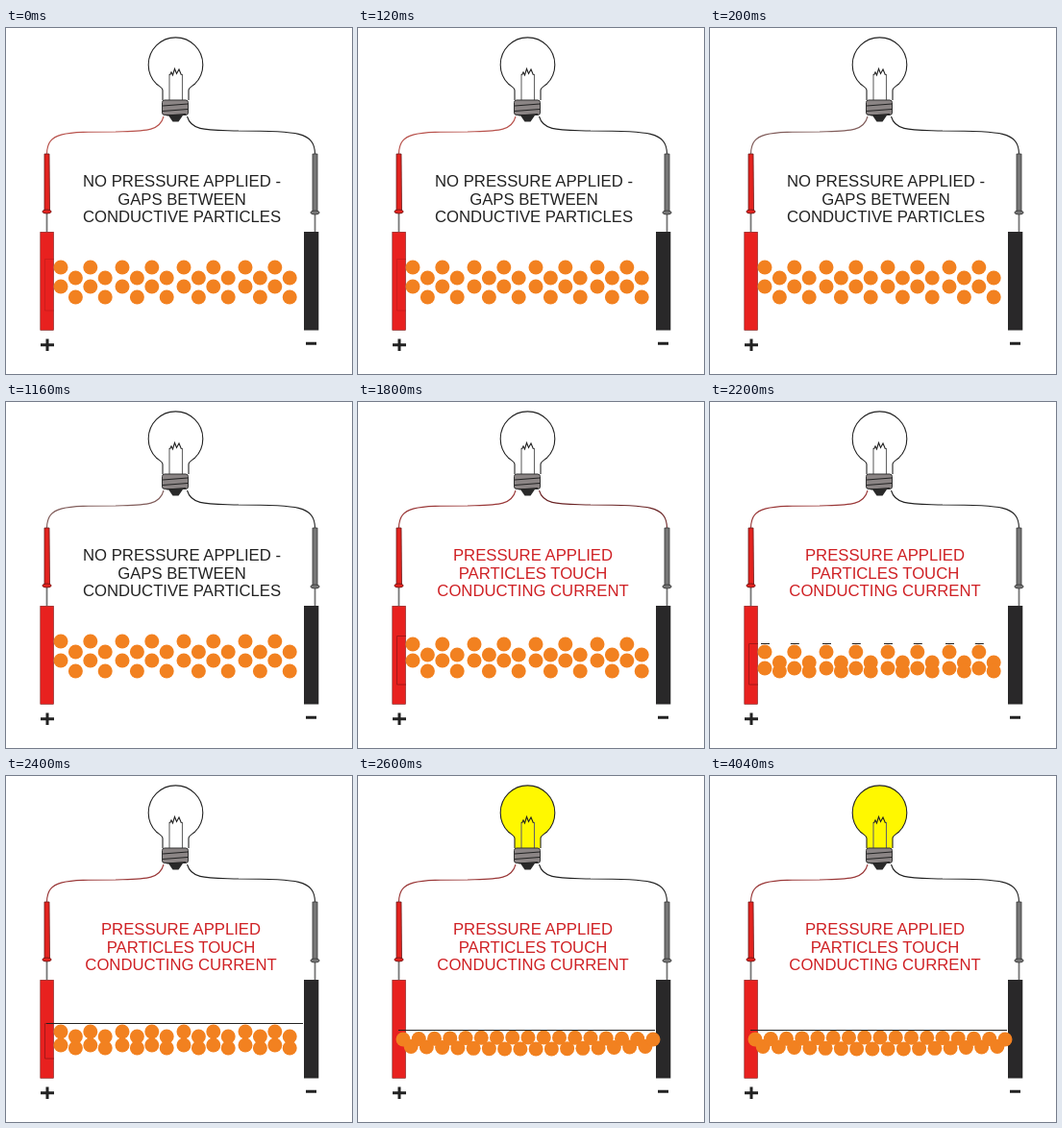
These frames come from a looping animation (360 px wide and 360 px high, 5000 ms). An HTML page:

```html
<!DOCTYPE html>
<html lang="en">
<head>
<meta charset="utf-8">
<title>Pressure-sensitive conduction</title>
<style>
  html, body { margin: 0; width: 100%; height: 100%; overflow: hidden; background: #fff; }
  svg { display: block; width: 100vw; height: 100vh; }
  text { font: 16.7px "Liberation Sans", Arial, sans-serif; text-anchor: middle; }
  .line { fill: none; stroke: #222; stroke-width: 1.1; }
</style>
</head>
<body>
<svg viewBox="0 0 360 360">
  <!-- bulb -->
  <path id="glass" class="line"
    d="M163 75V65C163 62 160 61 156.500 58.200A28.300 28.300 0 1 1 196.500 58.200C193 61 190 62 190 65V75"/>
  <path class="line" style="stroke:#666" d="M170 75V48M183.500 75V48"/>
  <path class="line" d="M170.500 49L172 46 173.500 49 175.500 42.500 177.500 47.500 180 43 182.500 49"/>
  <path d="M169 91H184L179.500 97.500H173.500Z" fill="#292929"/>
  <rect x="162.500" y="75" width="27" height="15.500" rx="2.500" fill="#8b8585" stroke="#333"/>
  <path class="line" d="M163 81L189 79M163 86.500L189 84.500M167 91L187 89.500"/>

  <!-- wires -->
  <path id="wireL" class="line" d="M164 92C160 108 144 107 114 108C60 108 43 108 42.500 131"/>
  <path id="wireR" class="line" d="M188.500 92C193 108 211 106 242 107C303 107 321 108 321.500 131"/>

  <!-- probes -->
  <path class="line" style="stroke:#777;stroke-width:1.8" d="M42.500 192V212M321.500 192V212"/>
  <g fill="#e3231f" stroke="#651717" stroke-width=".8">
    <path d="M40 131H45L45.500 190H40Z"/><ellipse cx="42.500" cy="191" rx="4.700" ry="2"/>
  </g>
  <g fill="#777" stroke="#333" stroke-width=".8">
    <path d="M319 131H324V191H319Z"/><ellipse cx="321.500" cy="192" rx="4.700" ry="2"/>
  </g>

  <!-- electrodes -->
  <rect x="35.800" y="212.300" width="13.700" height="102" fill="#e8211f" stroke="#7d1a18" stroke-width=".6"/>
  <rect x="310" y="212" width="15.300" height="102.500" fill="#292829"/>
  <path d="M36 329.800H50M43 323.500V336M312 328.300H323" fill="none" stroke="#222" stroke-width="3"/>

  <path id="sleeve" fill="none" stroke="#a51717"/>
  <g id="beads" fill="#f28120"></g>
  <path id="plate" class="line"/>
  <g id="label"></g>
</svg>
<script>
const $ = id => document.getElementById(id);
const idleText = ["NO PRESSURE APPLIED -", "GAPS BETWEEN", "CONDUCTIVE PARTICLES"];
const pressedText = ["PRESSURE APPLIED", "PARTICLES TOUCH", "CONDUCTING CURRENT"];
const lastStage = 5;

const range = (n, fn) => Array.from({ length: n }, (_, i) => fn(i));

// Columns stand in groups of four
const columnX = i => 57 + 64 * (i >> 2) + 15.4 * (i % 4);

// Separate beads: the upper rows follow the plate and push the lower ones down
function looseBeads(drop) {
  return range(16, i => {
    const odd = i % 2;
    const top = odd ? Math.min(260 + drop, 271) : 249 + drop;
    const low = odd ? Math.max(280, 266 + drop)
                    : Math.min(280, Math.max(269, top + 17));
    return [[columnX(i), top], [columnX(i), low]];
  }).flat();
}

// Touching beads: a zigzag chain that swings wider in the middle
function chainBeads() {
  return range(33, i => {
    const swing = 3 + 2 * Math.sin(Math.PI * i / 32);
    return [47 + 8.125 * i, 277 + swing * (i % 2 ? 1.4 : -1)];
  });
}

function platePath(stage, y) {
  if (stage < 2) return "";
  if (stage > 3) return `M42 ${y}H309`;
  return range(8, i => `M${columnX(2 * i) - 4} ${y}h9`).join("");
}

function draw(stage, starting) {
  const on = stage > 0, lit = stage === lastStage;
  const drop = Math.round(stage * (2.1 + 0.53 * stage));
  const y = 240.5 + drop;
  $("glass").style.fill = lit ? "#fff800" : "none";
  $("wireL").style.stroke = on ? "#9a3838" : starting ? "#b8524c" : "#805c5a";
  $("wireR").style.stroke = on && stage < 3 ? "#6a2425" : "#222";
  $("sleeve").setAttribute("d", `M50 ${y}H40.500V294H50`);
  $("sleeve").style.opacity = lit ? 0 : on ? 1 : starting ? 0.4 : 0;
  $("plate").setAttribute("d", platePath(stage, y));
  $("beads").innerHTML = (lit ? chainBeads() : looseBeads(drop))
    .map(([x, y]) => `<circle cx="${x}" cy="${y}" r="7.500"/>`).join("");
  $("label").setAttribute("fill", on ? "#cf2024" : "#222");
  $("label").innerHTML = (on ? pressedText : idleText)
    .map((s, i) => `<text x="${on ? 182 : 183}" y="${165.4 + i * 18.2}">${s}</text>`).join("");
}

let shown = "";
function tick() {
  const t = performance.now() % 5000;
  const stage = Math.min(lastStage, Math.max(0, Math.floor((t - 1600) / 200)));
  const starting = t < 200;
  const key = `${stage} ${starting}`;
  if (key !== shown) draw(stage, starting);
  shown = key;
  requestAnimationFrame(tick);
}
tick();
</script>
</body>
</html>
```
